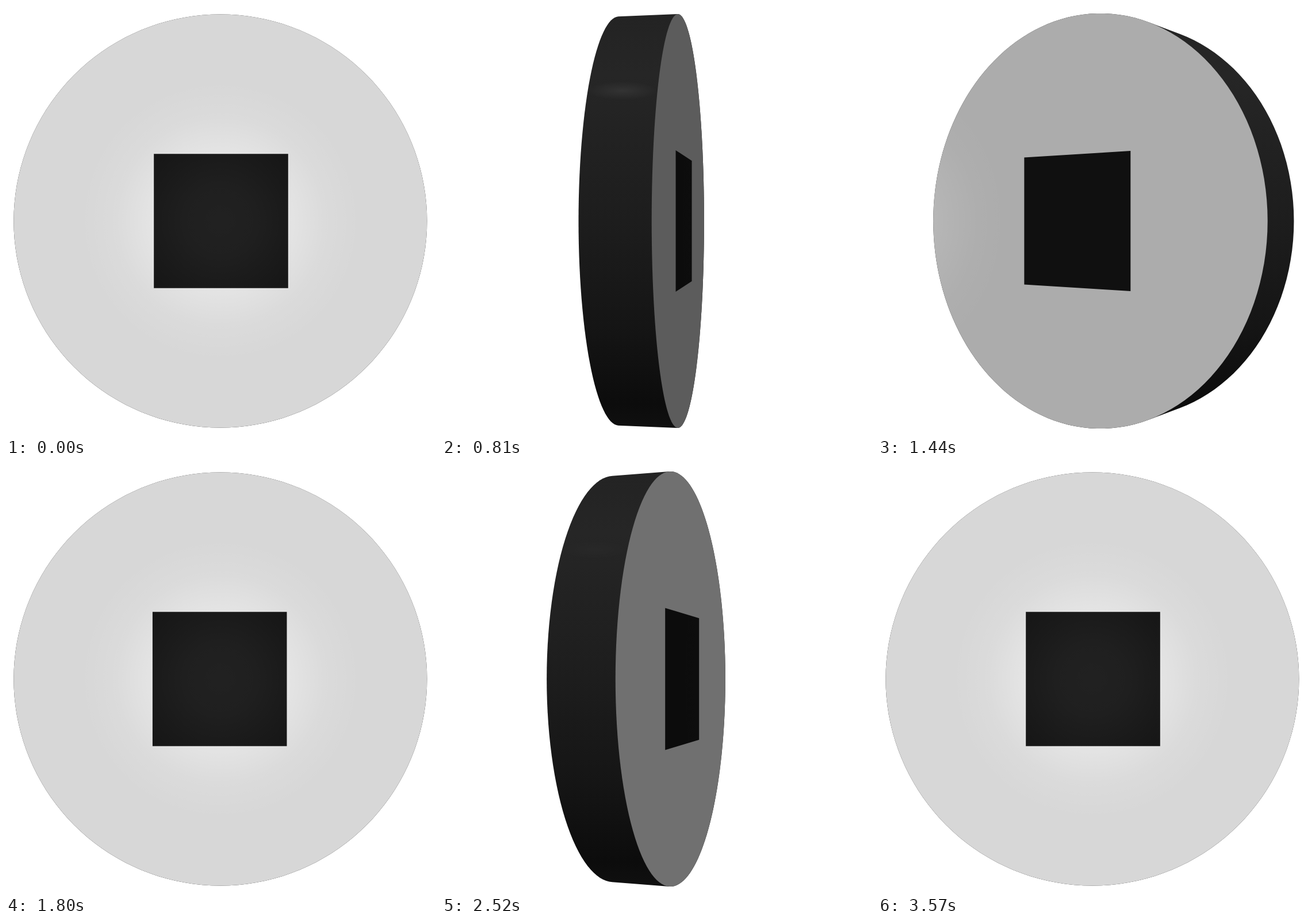
Recreate the animation shown at these times as an HTML page. Size 748 by 748 pixels, loop 3600 ms.

```html
<!DOCTYPE html>
<html lang="en">
<head>
<meta charset="utf-8">
<title>Turning coin</title>
<style>
  html, body { margin: 0; width: 100%; height: 100%; overflow: hidden; background: #fff; }
  svg { display: block; width: 100vw; height: 100vh; }
</style>
</head>
<body>
<svg viewBox="0 0 748 748">
  <defs>
    <linearGradient id="rim" gradientUnits="userSpaceOnUse" x1="0" y1="12" x2="0" y2="736">
      <stop offset="0" stop-color="#232323"/>
      <stop offset=".15" stop-color="#262626"/>
      <stop offset=".5" stop-color="#1d1d1d"/>
      <stop offset=".75" stop-color="#151515"/>
      <stop offset=".94" stop-color="#0c0c0c"/>
      <stop offset="1" stop-color="#101010"/>
    </linearGradient>
    <radialGradient id="glow" gradientUnits="userSpaceOnUse" cx="0" cy="0" r="1">
      <stop offset="0" stop-color="#fff"/>
      <stop offset=".25" stop-color="#fff" stop-opacity=".87"/>
      <stop offset=".5" stop-color="#fff" stop-opacity=".5"/>
      <stop offset=".75" stop-color="#fff" stop-opacity=".15"/>
      <stop offset="1" stop-color="#fff" stop-opacity="0"/>
    </radialGradient>
    <radialGradient id="shine">
      <stop offset="0" stop-color="#fff"/>
      <stop offset=".5" stop-color="#fff" stop-opacity=".5"/>
      <stop offset="1" stop-color="#fff" stop-opacity="0"/>
    </radialGradient>
  </defs>
  <path id="wall" fill="url(#rim)"/>
  <ellipse id="streak" rx="62" ry="16" fill="url(#shine)"/>
  <g id="side">
    <path id="face"/>
    <path id="faceGlow" fill="url(#glow)"/>
    <path id="mark"/>
    <path id="markGlow" fill="url(#glow)"/>
  </g>
</svg>
<script>
const LOOP = 3600, STEP = 30, HALF = 1800, LAST = 3570;
const MID = 374, EYE = 1396, RADIUS = 346.9, DEPTH = 49, MARK = 112.7, SHIFT = 1.1;
const el = id => document.getElementById(id);
const set = (id, attrs) => {
  for (const key in attrs) el(id).setAttribute(key, attrs[key]);
};

// Place a coin point (across, down, along the axle) on the stage.
function project(a, p, y, n) {
  const x = p * Math.cos(a) + n * Math.sin(a) - SHIFT;
  const k = EYE / (EYE - n * Math.cos(a) + p * Math.sin(a));
  return [MID + x * k, MID + y * k, k];
}

function ring(a, n) {
  return Array.from({ length: 144 }, (_, i) => {
    const f = i * Math.PI / 72;
    return project(a, RADIUS * Math.cos(f), RADIUS * Math.sin(f), n);
  });
}

const outline = pts => "M" + pts.map(p => p[0].toFixed(2) + " " + p[1].toFixed(2)).join("L") + "Z";

function hull(pts) {
  const sorted = pts.slice().sort((p, q) => p[0] - q[0] || p[1] - q[1]);
  const turn = (o, p, q) => (p[0] - o[0]) * (q[1] - o[1]) - (p[1] - o[1]) * (q[0] - o[0]);
  const chain = list => {
    const out = [];
    for (const p of list) {
      while (out.length > 1 && turn(out[out.length - 2], out[out.length - 1], p) <= 0) out.pop();
      out.push(p);
    }
    out.pop();
    return out;
  };
  return chain(sorted).concat(chain(sorted.reverse()));
}

const gray = v => `rgb(${[v, v, v].map(Math.round)})`;

function draw(ms) {
  const t = Math.floor((ms % LOOP) / STEP) * STEP;
  const spin = t < HALF ? Math.PI * t / HALF
    : Math.PI * (1 + (t - HALF) / (LAST - HALF));

  // The two sides are alike: work with the one turned to the viewer.
  const back = Math.cos(spin) < 0;
  let a = back ? spin - Math.PI : spin;
  if (a > Math.PI) a -= 2 * Math.PI;
  const c = Math.cos(a), s = Math.sin(a);

  const front = ring(a, DEPTH);
  set("wall", { d: outline(hull(front.concat(ring(a, -DEPTH)))) });

  const off = (Math.abs(a) * 180 / Math.PI - 83) / 8;
  const [sx, sy] = project(a, -Math.sign(a) * 297, -179, 0);
  set("streak", { cx: sx, cy: sy, opacity: .07 * Math.exp(-off * off) });

  const seen = EYE * c > DEPTH;
  set("side", { visibility: seen ? "visible" : "hidden" });
  if (!seen) return;

  const face = outline(front);
  const mid = back ? -SHIFT : SHIFT;
  const mark = outline([[-1, -1], [1, -1], [1, 1], [-1, 1]]
    .map(([u, v]) => project(a, mid + u * MARK, v * MARK, DEPTH)));
  set("face", { d: face, fill: gray(52 + 150 * c + 13 * c * c + 16 * s) });
  set("mark", { d: mark, fill: gray(10 + 8 * c) });

  // The reflection slides outwards, widens and fades as the coin turns away.
  const [gx, gy, k] = project(a, 800 * s, 0, DEPTH);
  const reach = 235 * k / c;
  set("glow", { gradientTransform: `translate(${gx} ${gy}) scale(${reach * c} ${reach})` });
  set("faceGlow", { d: face, opacity: .64 * c ** 6 });
  set("markGlow", { d: mark, opacity: .065 * c });
}

const start = performance.now();
function tick() {
  draw(performance.now() - start);
  requestAnimationFrame(tick);
}
tick();
</script>
</body>
</html>
```
